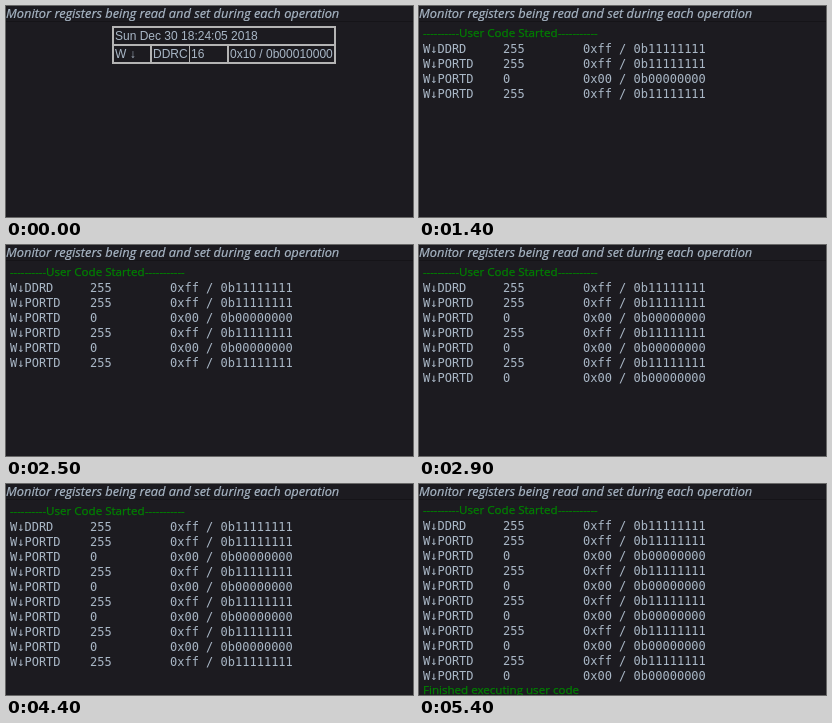
Write an HTML page that moves like this. It is 407 by 211 pixels and loops after 6200 ms.

```html
<!DOCTYPE html>
<html lang="en">
<head>
<meta charset="utf-8">
<title>Register monitor</title>
<style>
  html, body { margin: 0; width: 100%; height: 100%; overflow: hidden; background: #1c1b20; }
  svg { display: block; }
  text { white-space: pre; fill: #a9b7c6; }
  .title { font: italic 12.86px "Open Sans", sans-serif; stroke: #a9b7c6; stroke-width: .2; }
  .table text { font: 12px "Liberation Sans", sans-serif; }
  .table path { fill: none; stroke: #b4b4b4; stroke-width: 2; }
  .table .thin { stroke-width: 1; }
  .log text { font: 12px "DejaVu Sans Mono", monospace; }
  .log .note { font: 11.6px "Open Sans", sans-serif; fill: #008000; stroke: #008000; stroke-width: .25; }
  .log .dash { font-size: 11.2px; }
</style>
</head>
<body>
<svg width="407" height="211" viewBox="0 0 407 211">
  <path d="M0 15.5H407" stroke="#151418"/>
  <text class="title" x="0" y="12">Monitor registers being read and set during each operation</text>
  <g class="table" id="table">
    <path d="M107 21H329V57H107ZM107 39H329M145 39V57M222 39V57"/>
    <path class="thin" d="M183.5 39V57"/>
    <text x="109" y="34">Sun Dec 30 18:24:05 2018</text>
    <text x="109" y="52">W ↓</text>
    <text x="147" y="52">DDRC</text>
    <text x="185" y="52">16</text>
    <text x="224" y="52">0x10 / 0b00010000</text>
  </g>
  <g class="log" id="log"></g>
</svg>
<script>
const LOOP = 6200, LOG_START = 500, LOG_END = 5400;
const rowTimes = [500, 500, 900, 1400, 1900, 2500, 2900, 3500, 3900, 4400, 4900];
const table = document.getElementById("table");
const log = document.getElementById("log");
const entries = [];

function addText(time, x, y, content, className = "") {
  const node = document.createElementNS("http://www.w3.org/2000/svg", "text");
  node.setAttribute("x", x);
  node.setAttribute("y", y);
  node.setAttribute("class", className);
  node.textContent = content;
  log.append(node);
  entries.push({ time, node });
}

addText(LOG_START, 4, 31, "-".repeat(10), "note dash");
addText(LOG_START, 40, 31, "User Code Started", "note");
addText(LOG_START, 139, 31, "-".repeat(11), "note dash");
rowTimes.forEach((time, i) => {
  const y = 47 + 15 * i;
  const on = i === 0 || i % 2 === 1;
  addText(time, 4, y, i ? "W↓PORTD" : "W↓DDRD");
  addText(time, 84, y, on ? "255" : "0");
  addText(time, 164, y, on ? "0xff / 0b11111111" : "0x00 / 0b00000000");
});
addText(LOG_END, 4, 211, "Finished executing user code", "note");

function draw(now) {
  const t = now % LOOP;
  table.style.display = t < LOG_START ? "" : "none";
  for (const { time, node } of entries) node.style.display = t >= time ? "" : "none";
  // The last line pushes the log up by one pixel.
  log.setAttribute("transform", `translate(0 ${t >= LOG_END ? -1 : 0})`);
  requestAnimationFrame(draw);
}
draw(performance.now());
</script>
</body>
</html>
```
